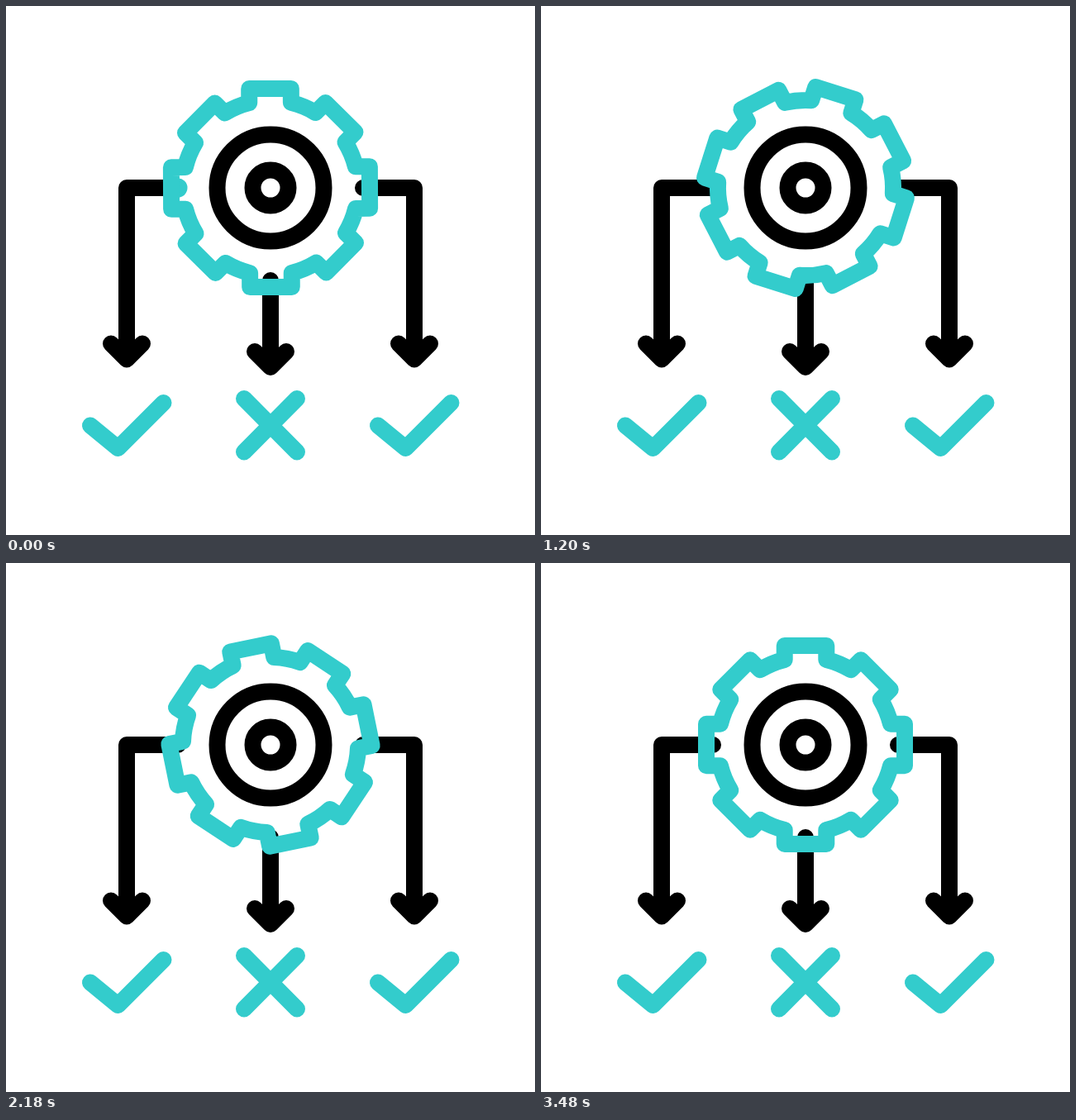
An HTML page with a canvas for the animation above (3.6 s loop, 640 by 640 pixels).

```html
<!DOCTYPE html>
<html lang="en">
<head>
<meta charset="utf-8">
<title>Gear process</title>
<style>
html, body { margin: 0; width: 100%; height: 100%; overflow: hidden; background: #fff; }
canvas { display: block; width: 640px; height: 640px; }
</style>
</head>
<body>
<canvas id="stage" width="640" height="640"></canvas>
<script>
const ctx = document.getElementById('stage').getContext('2d');
const TEAL = '#33cccc', BLACK = '#000', LOOP = 3600;
const THIN = 20, THICK = 23;

// Each shape is a list of polylines, drawn one after the other.
const head = (x, y, side) => [[x + 19 * side, y - 19], [x, y], [x - 19 * side, y - 19]];
const check = x => [[[x, 507.5], [x + 33.5, 535], [x + 88.5, 480]]];
const branches = [
  { start: 0, phase: 400,
    arrow: [[[208, 220], [146, 220], [146, 427.5]], head(146, 427.5, 1)],
    mark: check(102) },
  { start: 1300, phase: 290,
    arrow: [[[320, 332], [320, 437]], head(320, 437, -1)],
    mark: [[[288, 475], [352, 539.5]], [[352, 475], [288, 539.5]]] },
  { start: 2525, phase: 290,
    arrow: [[[432, 220], [494, 220], [494, 427.5]], head(494, 427.5, -1)],
    mark: check(450) }
];

// Time and gear angle in degrees
const turns = [[0, 0], [360, -85], [840, -180], [1540, -320.3], [2180, -461.3], [2540, -534.2], [3480, -720]];

const ease = (t, start, length) => {
  const u = Math.min(1, Math.max(0, (t - start) / length));
  return u * u * (3 - 2 * u);
};

function gearAngle(t) {
  if (t >= 3480) return 0;
  const i = turns.findIndex(([time]) => time > t);
  const [t0, a0] = turns[i - 1], [t1, a1] = turns[i];
  return (a0 + (a1 - a0) * (t - t0) / (t1 - t0)) * Math.PI / 180;
}

const distance = ([x0, y0], [x1, y1]) => Math.hypot(x1 - x0, y1 - y0);

// Strokes the part of a shape between two fractions of its whole length.
function trace(shape, color, width, from = 0, to = 1) {
  if (from >= to) return;
  let total = 0, passed = 0;
  for (const line of shape)
    for (let i = 1; i < line.length; i++) total += distance(line[i - 1], line[i]);
  ctx.beginPath();
  for (const line of shape) {
    let open = false;
    for (let i = 1; i < line.length; i++) {
      const a = line[i - 1], b = line[i], len = distance(a, b);
      const p = Math.max(0, (from * total - passed) / len);
      const q = Math.min(1, (to * total - passed) / len);
      passed += len;
      if (p >= q) continue;
      const at = k => [a[0] + (b[0] - a[0]) * k, a[1] + (b[1] - a[1]) * k];
      if (!open) ctx.moveTo(...at(p));
      ctx.lineTo(...at(q));
      open = true;
    }
  }
  ctx.strokeStyle = color;
  ctx.lineWidth = width;
  ctx.stroke();
}

function ring(radius) {
  ctx.beginPath();
  ctx.arc(0, 0, radius, 0, 2 * Math.PI);
  ctx.stroke();
}

function drawGear(t) {
  const drop = 3 * (ease(t, 0, 400) - ease(t, 400, 400));
  ctx.save();
  ctx.translate(320, 220 + drop);
  ctx.lineWidth = THIN;
  ctx.strokeStyle = BLACK;
  ring(64.5);
  ring(21.5);

  ctx.rotate(gearAngle(t));
  ctx.strokeStyle = TEAL;
  ctx.beginPath();
  const half = Math.atan2(25.3, 103), valley = Math.hypot(25.3, 103);
  for (let i = 0; i < 8; i++) {
    ctx.lineTo(-25.3, -120);
    ctx.lineTo(25.3, -120);
    ctx.arc(0, 0, valley, half - Math.PI / 2, -Math.PI / 4 - half);
    ctx.rotate(Math.PI / 4);
  }
  ctx.closePath();
  ctx.stroke();
  ctx.restore();
}

function draw(t) {
  ctx.fillStyle = '#fff';
  ctx.fillRect(0, 0, 640, 640);
  ctx.lineCap = ctx.lineJoin = 'round';
  for (const { start, phase, arrow, mark } of branches) {
    const [first, second, third] = [0, 1, 2].map(n => ease(t, start + n * phase, phase));
    trace(arrow, BLACK, THIN);
    trace(arrow, TEAL, THICK, second, first);
    trace(mark, TEAL, THIN);
    trace(mark, BLACK, THICK, third, second);
  }
  drawGear(t);
}

function tick() {
  draw(performance.now() % LOOP);
  requestAnimationFrame(tick);
}
tick();
</script>
</body>
</html>
```
